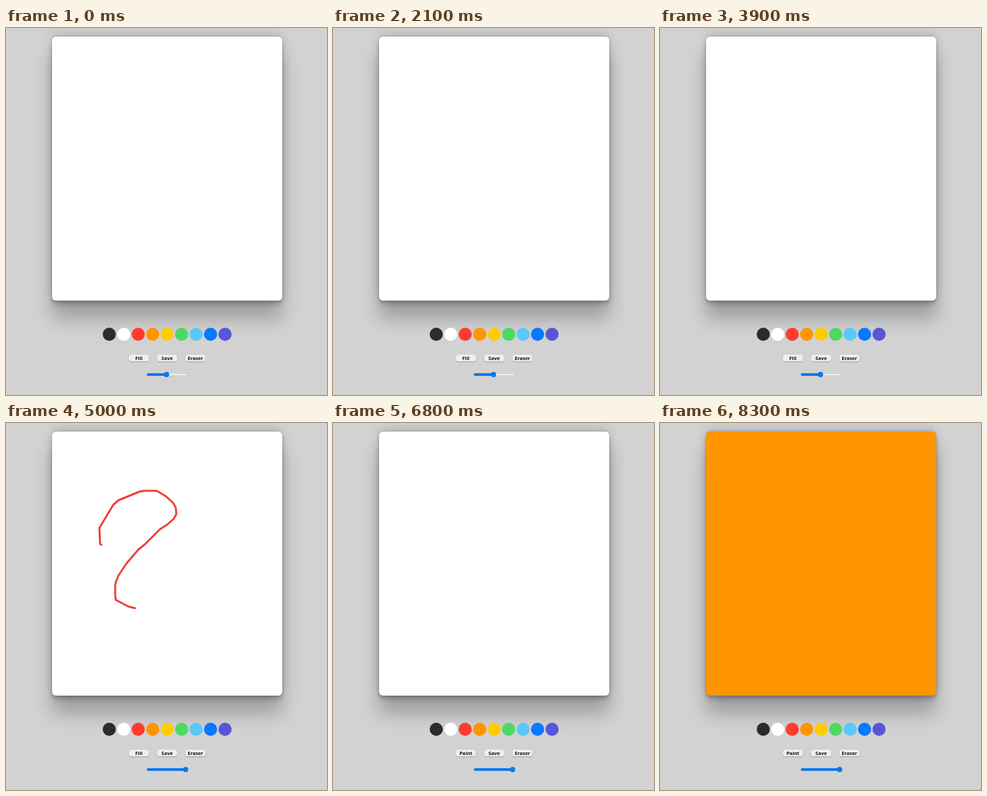
Write an HTML page that moves like this. It is 488 px wide and 556 px high and loops after 8400 ms.

```html
<!DOCTYPE html>
<html lang="en">
<head>
<meta charset="utf-8">
<title>Paint board</title>
<style>
  html, body { margin: 0; width: 100%; height: 100%; overflow: hidden; background: #d2d2d2; }
  #board {
    position: absolute; left: 70px; top: 13px; width: 350px; height: 400px;
    border-radius: 6px; background: #fff;
    box-shadow: rgba(0,0,0,.25) 0 27px 27.5px, rgba(0,0,0,.12) 0 -6px 15px,
      rgba(0,0,0,.12) 0 2px 3px, rgba(0,0,0,.17) 0 6px 6.5px, rgba(0,0,0,.09) 0 -1.5px 2.5px;
  }
  svg { position: absolute; left: 0; top: 0; display: block; }
  .button {
    position: absolute; top: 495px; width: 30px; height: 10px; border-radius: 3.5px;
    background: #efefef; box-shadow: 0 1px 1.5px rgba(0,0,0,.25);
    font: 700 7.5px/10px "Open Sans", "Noto Sans", sans-serif; color: #111; text-align: center;
  }
</style>
</head>
<body>
<div id="board"></div>
<svg width="488" height="556" viewBox="0 0 488 556">
  <g id="ink" fill="none" stroke-linecap="round" stroke-linejoin="round"></g>
  <g id="palette"></g>
  <rect x="214.25" y="523.25" width="61.5" height="3.5" rx="1.75" fill="#efefef" stroke="#b2b2b2" stroke-width=".5"/>
  <rect id="level" x="214" y="523" height="4" rx="2" fill="#0b76ee"/>
  <circle id="thumb" cy="525" r="4" fill="#0b76ee"/>
</svg>
<div class="button" id="mode" style="left:187px">Fill</div>
<div class="button" style="left:230px">Save</div>
<div class="button" style="left:273px">Eraser</div>
<script>
const LOOP = 8400, STEP = 100;
const BLACK = '#2c2c2c', RED = '#f03e35', ORANGE = '#ff9500';
const colors = [BLACK, '#ffffff', '#ff3b30', ORANGE, '#ffcc00', '#4cd963', '#5ac8fa', '#0579ff', '#5856d6'];
const $ = id => document.getElementById(id);

function add(parent, tag, attrs) {
  const el = document.createElementNS('http://www.w3.org/2000/svg', tag);
  for (const k in attrs) el.setAttribute(k, attrs[k]);
  return parent.appendChild(el);
}

colors.forEach((fill, i) => add($('palette'), 'circle', { cx: 157 + 22 * i, cy: 464, r: 10, fill }));

// Each stroke grows in equal steps from start and is wiped at clear.
const strokes = [
  { start: 500, steps: 9, clear: 2000, color: BLACK, width: 1.5,
    d: 'M128 170L134 128 146 105 168 86 205 75 236 80 257 95 263 115 252 140 227 162 200 185 180 213 172 240 175 267 192 286 220 293 252 285 278 265 298 238 307 210' },
  { start: 1400, steps: 3, clear: 2000, color: BLACK, width: 1.5,
    d: 'M281 244L278 270 272 302 267 330 263 353' },
  { start: 3100, steps: 6, clear: 3800, color: RED, width: 1.5,
    d: 'M139 178L143 158 155 140 172 118 198 102 228 100 248 112 254 130 238 155 200 195 176 225 172 252 190 270 220 266 245 252 272 238 293 220 296 212' },
  { start: 4800, steps: 3, clear: 5800, color: RED, width: 3,
    d: 'M145 184.5L143 183 142 159 163 124 171 117 203 104 210 102.8 229 102.8 243 111 254 121 258 128 259 138 255 145 245 154 234 161 212 183 201 192 183 213 171 231 167 241 166 246 166 262 167 268 186 278 196 280.5' },
  { start: 5100, steps: 6, clear: 5800, color: RED, width: 3,
    d: 'M196 280.5L215 276 238 262 258 243 272 220 280 190 284 150 285 115 286 84' }
];
for (const s of strokes) {
  s.el = add($('ink'), 'path', { d: s.d, stroke: s.color, 'stroke-width': s.width });
  s.length = s.el.getTotalLength();
}

const clamp = v => Math.max(0, Math.min(1, v));

function draw(time) {
  const t = Math.floor((time % LOOP) / STEP) * STEP;
  for (const s of strokes) {
    const part = clamp(((t - s.start) / STEP + 1) / s.steps);
    const shown = part > 0 && t < s.clear;
    s.el.setAttribute('visibility', shown ? 'visible' : 'hidden');
    s.el.setAttribute('stroke-dasharray', part < 1 ? `${s.length * part} ${s.length + 9}` : 'none');
  }
  const x = 244 + 29 * clamp((t - 4200) / 400);
  $('thumb').setAttribute('cx', x);
  $('level').setAttribute('width', x - 214);
  $('mode').textContent = t >= 6300 ? 'Paint' : 'Fill';
  $('board').style.background = t >= 6900 ? ORANGE : '#fff';
}

const begin = performance.now();
function tick() {
  draw(performance.now() - begin);
  requestAnimationFrame(tick);
}
tick();
</script>
</body>
</html>
```
